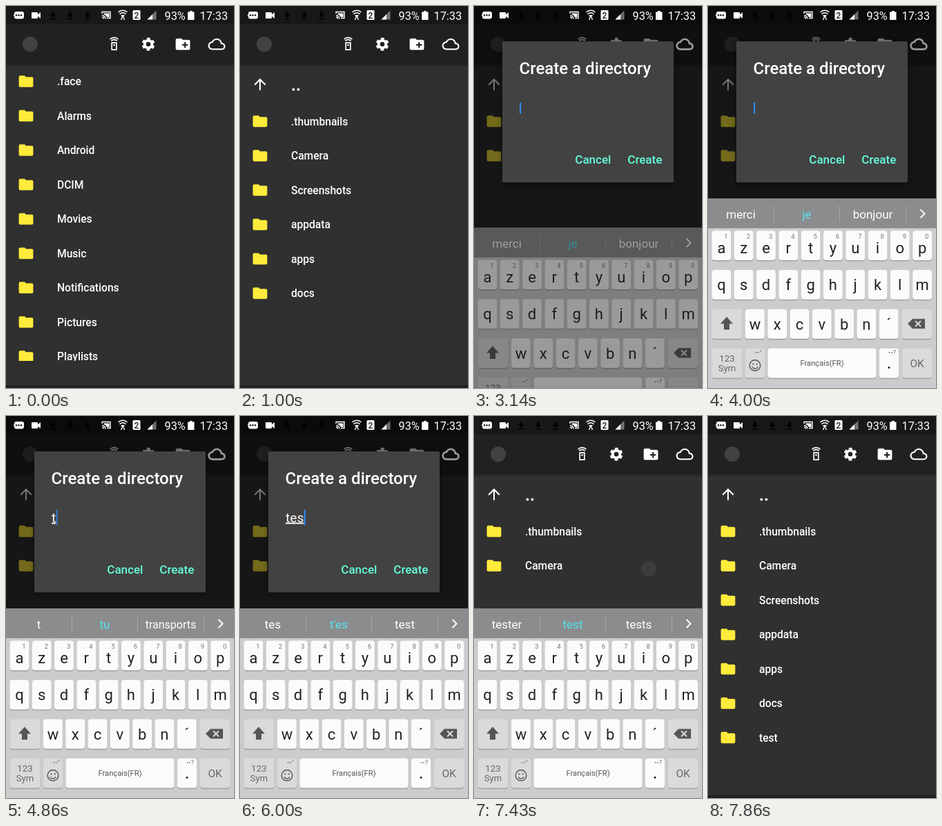
Write an HTML page that moves like this. It is 330 px wide and 550 px high and loops after 8 s.

```html
<!DOCTYPE html>
<html lang="en">
<head>
<meta charset="utf-8">
<title>Create a directory</title>
<style>
html, body { margin: 0; width: 100%; height: 100%; overflow: hidden; background: #303030; }
svg { display: block; width: 330px; height: 550px; font-family: Roboto, sans-serif; fill: #fff; }
text { white-space: pre; }
.mid { text-anchor: middle; }
.row { font-size: 15.6px; font-weight: 500; }
.line { fill: none; stroke: #fff; stroke-width: 2; }
.letter { font-size: 22px; fill: #222; text-anchor: middle; }
.hint { font-size: 9.5px; fill: #777; text-anchor: middle; }
.word { font-size: 17px; text-anchor: middle; }
.field { font-size: 19.2px; text-decoration: underline; text-decoration-thickness: 1px; text-underline-offset: 1.5px; }
.button { font-size: 17px; font-weight: 500; fill: #64ffda; }
</style>
</head>
<body>
<svg id="stage" viewBox="0 0 330 550"></svg>
<script>
const LOOP = 8000;
const stage = document.getElementById('stage');
const rules = [];
let count = 0;

// Returns a style that holds each value from its time until the next one.
function track(prop, steps) {
  const name = 'a' + count++;
  if (steps[0][0] > 0) steps = [[0, 0], ...steps];
  const frames = steps.map(([t, v]) => `${t / LOOP * 100}%{${prop}:${v}}`).join('');
  rules.push(`@keyframes ${name}{${frames}}`);
  return `${name} ${LOOP}ms step-end infinite`;
}
const animated = (content, ...tracks) => `<g style="animation:${tracks.join(',')}">${content}</g>`;
const fade = (content, steps) => animated(content, track('opacity', steps));
const during = (from, to, content) => fade(content, [[from, 1], [to, 0]]);

const rect = (x, y, w, h, fill, extra = '') =>
  `<rect x="${x}" y="${y}" width="${w}" height="${h}" fill="${fill}" ${extra}/>`;
const text = (x, y, s, cls = '', extra = '') => `<text x="${x}" y="${y}" class="${cls}" ${extra}>${s}</text>`;
const circle = (x, y, r, extra = '') => `<circle cx="${x}" cy="${y}" r="${r}" ${extra}/>`;
const path = (d, extra = '') => `<path d="${d}" ${extra}/>`;
const icon = (x, y, body, extra = '', scale = 1.04) =>
  `<g transform="translate(${x} ${y}) scale(${scale}) translate(-12 -12)" ${extra}>${body}</g>`;

const FOLDER = 'M10 4H4a2 2 0 0 0-2 2v12a2 2 0 0 0 2 2h16a2 2 0 0 0 2-2V8a2 2 0 0 0-2-2h-8z';
const CLOUD = path('M19.35 10.04C18.67 6.59 15.64 4 12 4 9.11 4 6.6 5.64 5.35 8.04 2.34 8.36 0 10.91 0 14c0 3.31 2.69 6 6 6h13c2.76 0 5-2.24 5-5 0-2.64-2.05-4.78-4.65-4.96zM19 18H6c-2.21 0-4-1.79-4-4s1.79-4 4-4h.71C7.37 7.69 9.48 6 12 6c3.04 0 5.5 2.46 5.5 5.5v.5H19c1.66 0 3 1.34 3 3s-1.34 3-3 3z');

function fileRow(name, y) {
  return icon(29, y - .5, path(FOLDER, 'fill="#ffeb3b"')) + text(74, y + 5.3, name, 'row');
}
const fileRows = (names, top) => names.map((name, i) => fileRow(name, top + i * 49.5)).join('');

function lists() {
  const root = fileRows(['.face', 'Alarms', 'Android', 'DCIM', 'Movies', 'Music',
    'Notifications', 'Pictures', 'Playlists'], 109);
  const parent = icon(29, 113, path('M12 20V5M4.5 12.5L12 5l7.5 7.5', 'class="line"')) +
    text(74, 121.5, '..', '', 'font-size="24" font-weight="700"');
  const folder = parent + fileRows(['.thumbnails', 'Camera', 'Screenshots', 'appdata', 'apps', 'docs'], 166.5);
  return `<clipPath id="listClip">${rect(0, 84, 330, 427, '#fff')}</clipPath><g clip-path="url(#listClip)">` +
    fade(root, [[0, 1], [850, 0]]) + during(850, LOOP, folder) +
    during(7570, LOOP, fileRow('test', 463.5)) + '</g>' +
    during(3000, 7570, rect(0, 239, 330, 307, '#303030'));
}

function header() {
  const remote = path('M8 10h8v12H8zM7 6.8a7 7 0 0 1 10 0M5 4a10 10 0 0 1 14 0', 'class="line"') +
    circle(12, 14, 1.5);
  const gear = circle(12, 12, 5.3, 'class="line" style="stroke-width:4"') +
    circle(12, 12, 7.9, 'class="line" style="stroke-width:3" stroke-dasharray="4.6 3.67" stroke-dashoffset="6.43"');
  const add = path(FOLDER) + path('M15 9v8M11 13h8', 'stroke="#212121" stroke-width="2"');
  const shadow = [0, 1, 2, 3].map(i => rect(0, 84 + i, 330, 1, '#000', `opacity="${.2 - i * .05}"`)).join('');
  return rect(0, 0, 330, 26, '#181818') + rect(0, 26, 330, 58, '#212121') + shadow +
    circle(35, 55, 11, 'fill="#424242"') +
    `<clipPath id="headClip">${rect(0, 26, 330, 58, '#fff')}</clipPath><g clip-path="url(#headClip)">` +
    fade(circle(256, 55, 16, 'opacity=".16"'), [[2430, 1], [2570, 0]]) +
    fade(circle(256, 55, 36, 'opacity=".16"'), [[2570, 1], [2710, .5], [2860, 0]]) + '</g>' +
    icon(156.5, 54.5, remote, '', .84) + icon(206, 55, gear, '', 1) +
    icon(256, 55, add) + icon(305, 55, CLOUD);
}

function statusBar() {
  const download = x => path(`M${x - 1.5} 8.5h3v4h3l-4.5 4.5-4.500-4.500h3zM${x - 4.5} 18h9v1.5h-9z`, 'fill="#000"');
  const dots = [15, 18.5, 22].map(x => circle(x, 13.2, 1.2, 'fill="#181818"')).join('');
  return rect(12, 8, 14, 10.5, '#fff', 'rx="3"') + path('M10.500 13.200l3-2.500v5z') + dots +
    rect(37, 9, 9, 9, '#fff', 'rx="1"') + path('M45 13l5-4v9l-5-4z') +
    [68, 93, 118].map(download).join('') +
    path('M139 11V8.500h12v9h-5M139 13.500a5 5 0 0 1 5 5M139 16a2.500 2.500 0 0 1 2.500 2.500', 'class="line" style="stroke-width:1.4"') +
    path('M141.500 10.500h8v5.500h-3.500a7 7 0 0 0-4.500-4z') +
    path('M162.500 9a9 9 0 0 1 13 0M164.500 11.800a6 6 0 0 1 9 0M166.500 14.500a3.500 3.500 0 0 1 5 0M166.500 20l2.500-6 2.500 6', 'class="line" style="stroke-width:1.4"') +
    rect(183.5, 6, 11, 14, '#fff', 'rx="1.5"') +
    text(189, 17.5, '2', 'mid', 'font-size="12" font-weight="500" style="fill:#181818"') +
    path('M217.500 6.500v13h-13z', 'opacity=".4"') + path('M212 12v7.500h-7.500z') +
    text(229.5, 19.5, '93%', '', 'font-size="16.3"') + path('M263 8.500h3V7h3.500v1.500h3V20H263z') +
    text(280.5, 19.5, '17:33', '', 'font-size="16.3"');
}

// One stage of typing: the text, where the caret stands and when it shows.
function typed(from, to, word, caretX, blink) {
  return during(from, to, (word ? text(66, 101.5, word, 'field') : '') +
    fade(rect(caretX, word ? 84 : 88, 2.2, word ? 22 : 16, '#2f8bf0'), blink));
}

function dialog() {
  const panel = h => rect(41, 0, 248, h, '#424242', 'rx="2" filter="url(#shadow)"') +
    text(146.3, h - 27.5, 'Cancel', 'button') + text(222.3, h - 27.5, 'Create', 'button');
  const tall = panel(208) + rect(66, 116.5, 198, 1, '#a5a5a5');
  const body = fade(tall, [[0, 1], [3000, 0]]) + during(3000, LOOP, panel(203)) +
    text(65.5, 46.8, 'Create a directory', '', 'font-size="24" font-weight="500"') +
    typed(2570, 4570, '', 66, [[2570, 1], [3570, 0], [4000, 1], [4430, 0]]) +
    typed(4570, 5290, 't', 72.5, [[4570, 1], [4860, .75], [5000, 0]]) +
    typed(5290, 5860, 'te', 83, [[5290, 1]]) +
    typed(5860, 6570, 'tes', 92.5, [[5860, 1]]) +
    typed(6570, LOOP, 'test', 99, [[6570, 1], [7000, 0]]);
  return animated(body,
    track('opacity', [[2570, .72], [2710, 1], [7290, .45], [7430, 0]]),
    track('transform', [[0, 'translateY(184px)'], [3000, 'translateY(51px)']]));
}

const KEY_GREY = '#d9dadb';

function key(x, y, w, fill = '#fafbfb') {
  return rect(x, y + 1.2, w, 43, '#a6a8aa', 'rx="4"') + rect(x, y, w, 42.5, fill, 'rx="4"');
}

function suggestions(from, to, words) {
  return during(from, to, words.map((w, i) =>
    text(47.5 + i * 95.5, 306, w, 'word', (i === 1 ? 'fill="#55e3f3"' : '') +
      (w.length > 9 ? ' style="font-size:16px"' : ''))).join(''));
}

function keyboard() {
  const pitch = 32.3, ink = '#555';
  const letters = (chars, x0, y, digits) => [...chars].map((c, i) => {
    const x = x0 + i * pitch;
    return key(x, y, 27.8) + text(x + 13.9, y + (digits ? 32 : 29), c, 'letter') +
      (digits ? text(x + 20.5, y + 11.5, (i + 1) % 10, 'hint') : '');
  }).join('');
  const press = (from, to, column, y) =>
    during(from, to, rect(5.5 + column * pitch, y, 27.8, 42.5, '#000', 'rx="4" opacity=".22"'));
  const body = rect(0, 277, 330, 43, '#8b8c8d') + rect(0, 320, 330, 230, '#cbccce') +
    [95, 190, 286].map(x => rect(x, 288, 1, 23, '#a6a7a8')).join('') +
    path('M307.500 293l6 6-6 6', 'class="line"') +
    suggestions(0, 4570, ['merci', 'je', 'bonjour']) +
    suggestions(4570, 5290, ['t', 'tu', 'transports']) +
    suggestions(5290, 5860, ['te', 'tes', 'test']) +
    suggestions(5860, 6570, ['tes', 't\'es', 'test']) +
    suggestions(6570, LOOP, ['tester', 'test', 'tests']) +
    letters('azertyuiop', 5.5, 323.5, true) + letters('qsdfghjklm', 5.5, 380, false) +
    letters('wxcvbn´', 54, 436.5, false) +
    key(5.5, 436.5, 44, KEY_GREY) + path('M27 447.500l-9 10h5v8.500h8v-8.500h5z', `fill="${ink}"`) +
    key(281, 436.5, 43, KEY_GREY) + path('M289 457.500l7-7h18v14h-18z', `fill="${ink}"`) +
    path('M300 453.500l8 8m0-8l-8 8', `stroke="${KEY_GREY}" stroke-width="2"`) +
    key(5.5, 493, 44, KEY_GREY) + text(27.5, 511.5, '123', 'mid', 'font-size="13.3" fill="#666"') +
    text(27.5, 525.5, 'Sym', 'mid', 'font-size="13" fill="#666"') +
    key(54, 493, 28, KEY_GREY) + text(73, 502, '••°', 'hint') +
    circle(68, 517.5, 7.8, `fill="none" stroke="${ink}" stroke-width="1.4"`) +
    path('M64 519.500a4.300 4.300 0 0 0 8 0', `fill="none" stroke="${ink}" stroke-width="1.3"`) +
    circle(65.2, 515.5, 1.1, `fill="${ink}"`) + circle(70.8, 515.5, 1.1, `fill="${ink}"`) +
    key(86.5, 493, 157) + text(165, 518, 'Français(FR)', 'mid', `font-size="11.2" fill="${ink}"`) +
    key(248, 493, 28) + text(262, 521.5, '.', 'letter', 'font-weight="500"') + text(266.5, 502, '••?', 'hint') +
    key(281, 493, 43, KEY_GREY) + text(302.5, 519.5, 'OK', 'mid', 'font-size="15.4" fill="#666"') +
    press(4430, 4710, 4, 323.5) + press(5140, 5430, 2, 323.5) +
    press(5710, 6000, 1, 380) + press(6430, 6710, 4, 323.5);
  const shift = y => `translateY(${y}px)`;
  return animated(body,
    track('opacity', [[3000, .2], [3140, .58], [3290, .9], [3430, 1], [7570, .7], [7710, .25], [7860, 0]]),
    track('transform', [[0, shift(110)], [3140, shift(42)], [3290, shift(10)], [3430, shift(0)],
      [7570, shift(50)], [7710, shift(140)]]));
}

function touch(x, y, steps) {
  return fade(circle(x, y, 11, 'fill="#a9a9ac" opacity=".5"'), steps);
}

stage.innerHTML =
  '<filter id="shadow" x="-10%" y="-10%" width="120%" height="125%">' +
  '<feDropShadow dx="0" dy="4" stdDeviation="4" flood-opacity=".4"/></filter>' +
  rect(0, 0, 330, 550, '#303030') + lists() + header() + rect(0, 546, 330, 4, '#231e21') +
  fade(rect(0, 0, 330, 550, '#000'), [[2570, .42], [2710, .55], [7290, .25], [7430, 0]]) +
  during(2710, 7290, icon(305, 55, CLOUD, 'fill="#a8a8a8"')) +
  statusBar() + dialog() + keyboard() +
  touch(280, 257, [[710, .7], [850, .3], [1000, 0]]) +
  touch(262, 54, [[2430, .8], [2570, .7], [2710, .3], [2860, 0]]) +
  touch(149, 345, [[4430, .7], [4570, .3], [4710, 0]]) +
  touch(84, 345, [[5140, .7], [5290, .3], [5430, 0]]) +
  touch(52, 402, [[5710, .7], [5860, .3], [6000, 0]]) +
  touch(149, 345, [[6430, .7], [6570, .3], [6710, 0]]) +
  touch(253, 220, [[7290, .7], [7430, .22], [7570, 0]]);

const sheet = document.createElement('style');
sheet.textContent = rules.join('\n');
document.head.append(sheet);
</script>
</body>
</html>
```
